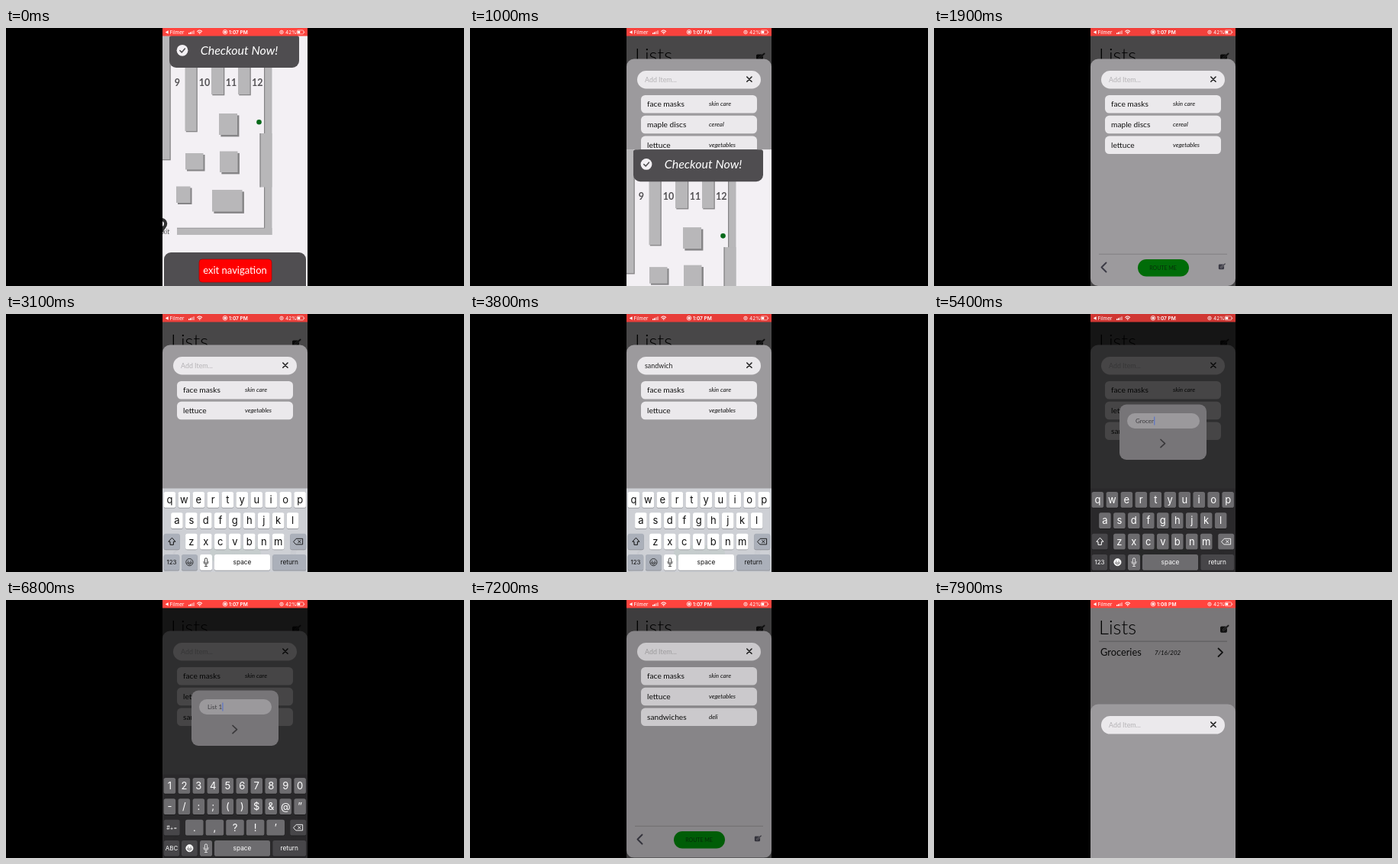
Write an HTML page that moves like this. It is 600 by 338 pixels and loops after 8000 ms.

```html
<!DOCTYPE html>
<html lang="en">
<head>
<meta charset="utf-8">
<title>Shopping list demo</title>
<style>
html, body { margin: 0; width: 100%; height: 100%; overflow: hidden; background: #000; }
svg { display: block; width: 600px; height: 338px; font-family: Lato, "Open Sans", sans-serif; }
text { white-space: pre; }
.ui { font-family: Inter, Roboto, sans-serif; }
.mid { text-anchor: middle; }
.it { font-style: italic; }
.line { fill: none; stroke-linecap: round; stroke-linejoin: round; }
</style>
</head>
<body>
<svg id="stage" viewBox="0 0 600 338"></svg>
<script>
const LOOP = 8000;
const rect = (x, y, w, h, fill, r = 0, extra = "") =>
  `<rect x="${x}" y="${y}" width="${w}" height="${h}" rx="${r}" fill="${fill}" ${extra}/>`;
const text = (x, y, size, fill, str, cls = "", extra = "") =>
  `<text x="${x}" y="${y}" font-size="${size}" fill="${fill}" class="${cls}" ${extra}>${str}</text>`;
const line = (d, color, width, extra = "") =>
  `<path class="line" d="${d}" stroke="${color}" stroke-width="${width}" ${extra}/>`;
const group = (id, body, extra = "") => `<g id="${id}" ${extra}>${body}</g>`;

const editIcon = (x, y, s, color) => `<g transform="translate(${x} ${y}) scale(${s})">` +
  rect(0, 1.5, 8.5, 8, color, 1.6) + line("M4 6.2L10 .8", "#89878a", 2.4) +
  line("M4 6.2L10 .8", color, 1.2) + "</g>";

function statusBar() {
  const bars = [0, 1, 2, 3].map(i =>
    rect(239 + i * 2.1, 6.2 - i, 1.5, 1.8 + i, "#fff", .3, i > 1 ? 'opacity=".55"' : "")).join("");
  return rect(205, 0, 190, 10.5, "#ff453f", 0, 'id="bar"') +
    '<path d="M212.6 3.2V7.8L208.8 5.5Z" fill="#fff"/>' +
    text(214.5, 7.7, 6.5, "#fff", "Filmer", "ui") + bars +
    line("M250.8 4.3Q253.7 1.8 256.6 4.3M252 5.9Q253.7 4.5 255.4 5.9", "#fff", 1.1) +
    '<circle cx="253.7" cy="7.3" r=".8" fill="#fff"/>' +
    '<circle cx="287" cy="5.3" r="2.8" fill="none" stroke="#fff" stroke-width=".8"/><circle cx="287" cy="5.3" r="1.5" fill="#fff"/>' +
    text(292, 7.7, 6.6, "#fff", "", "ui", 'id="clock" font-weight="600"') +
    '<circle cx="361" cy="5.4" r="2.2" fill="none" stroke="#fff" stroke-width=".8"/><circle cx="361" cy="5.4" r=".8" fill="#fff"/>' +
    text(366, 7.7, 6.5, "#fff", "42%", "ui") +
    rect(381, 2.9, 8.8, 5, "none", 1.3, 'stroke="#fff" stroke-width=".6"') +
    rect(381.8, 3.7, 3.4, 3.4, "#fff", .6) + rect(390.4, 4.5, .8, 1.8, "#fff", .4);
}

function mapView() {
  const block = (x, y, w, h, d = 2.4) => rect(x + d, y + d, w, h, "#858486") + rect(x, y, w, h, "#b8b7b9");
  const shelf = (x, y, w, h) => block(x, y, w, h, 1.3);
  return rect(205, 10, 190, 328, "#f3f0f4") +
    shelf(203, 10, 11.5, 162) + shelf(234.5, 20, 15, 115) + shelf(269, 20, 16, 67) + shelf(304, 20, 15.5, 67) +
    rect(338, 40, 10.5, 231, "#b8b7b9") + rect(338, 40, 1.2, 222, "#858486") +
    rect(332.5, 138, 16, 70.5, "#b8b7b9") + rect(332.5, 138, 1.2, 70.5, "#858486") +
    rect(224, 262, 124.5, 9, "#b8b7b9") + rect(224, 261.7, 115, 1, "#98979a") +
    block(279, 112, 24, 28) + block(235, 164, 23.5, 21.5, 2) + block(280, 161.5, 23.5, 27.5) +
    block(223, 207.5, 18.5, 21.5, 2) + block(270, 212, 39.5, 28.5) +
    [[9, 224.3], [10, 260], [11, 295], [12, 329.3]].map(([n, x]) =>
      text(x, 76.3, 12.5, "#555356", n, "mid", 'font-weight="700"')).join("") +
    '<circle cx="331.5" cy="123.2" r="3.3" fill="#08691a"/>' +
    '<circle cx="203.5" cy="256.5" r="5.6" fill="none" stroke="#333" stroke-width="4.2"/>' +
    '<path d="M210.6 259L204 270V264Z" fill="#333"/>' +
    text(214.5, 269.5, 9, "#555", "exit", "it", 'text-anchor="end"') +
    rect(214, 10, 170, 42, "#4f4d50", 9) + rect(214, 10, 170, 12, "#4f4d50", 3) +
    '<circle cx="231" cy="29.3" r="7.4" fill="#f3f0f4"/>' + line("M227.8 29.5L230.2 31.9L234.4 27", "#4f4d50", 1.5) +
    text(305.5, 35, 16, "#fff", "Checkout Now!", "it mid") +
    rect(207, 294, 186, 60, "#504e51", 9) +
    rect(253, 303, 95, 30, "#fe0000", 4, 'stroke="#a00" stroke-width=".7"') +
    text(300, 322, 13, "#fff", "exit navigation", "mid");
}

function listsPage() {
  return rect(205, 10, 190, 328, "#f3f0f4") +
    text(216, 45, 25.5, "#000", "Lists", "", 'font-weight="300"') + editIcon(375, 32.8, 1.05, "#222") +
    rect(216, 53.7, 168, .8, "#a5a3a6") + text(218, 73, 12.8, "#111", "Groceries") +
    text(289, 71.8, 8, "#111", "7/16/202", "it") + line("M372.5 63.5L378 68.7L372.5 74", "#222", 1.8);
}

function sheet() {
  const row = (id, name, kind) => group(id, rect(224, 88, 152, 23.5, "#ebe9ec", 5.5) +
    text(232, 103, 10.2, "#111", name) + text(313, 102, 8, "#111", kind, "it"));
  return rect(205, 40.5, 190, 297.5, "#9c9a9d", 10) +
    rect(219, 56, 162, 23.5, "#ebe9ec", 11.7) + text(229, 71, 8.9, "#b5b3b6", "", "", 'id="entry"') +
    line("M362.8 64L369 70.2M369 64L362.8 70.2", "#222", 1.6) +
    row("masks", "face masks", "skin care") + row("cereal", "maple discs", "cereal") +
    row("lettuce", "lettuce", "vegetables") + row("deli", "sandwiches", "deli") +
    rect(216, 295.8, 168, .8, "#7a787b") + line("M225.5 307.5L219.5 313.5L225.5 319.5", "#3c3b46", 1.9) +
    rect(267, 303, 67, 22.5, "#006c08", 11.2) + text(300, 316.7, 7, "#06300a", "ROUTE ME", "mid") +
    editIcon(372.8, 308.3, .85, "#3c3b46");
}

function popup() {
  return rect(243, 118.5, 114, 72.5, "#777578", 9) + rect(253, 130, 95, 20, "#9b999c", 10) +
    text(264, 142.8, 8, "#3d3c40", "", "", 'id="title"') +
    rect(264, 134.5, .9, 11, "#4668d8", 0, 'id="caret"') + line("M297 164.5L302.5 169.6L297 174.7", "#3a393b", 1.7);
}

const themes = {
  light: { bg: "#d1d3d9", key: "#fff", alt: "#abb0ba", ink: "#111", edge: "#898b90" },
  dark: { bg: "#2b2a2c", key: "#6d6c6f", alt: "#474649", ink: "#fff", edge: "#19191a" }
};

function keyboard(name, numeric) {
  const c = themes[name];
  const cap = (x, y, w, fill, label, size, extra = "") =>
    rect(x, y + .7, w, 20.8, c.edge, 2.6) + rect(x, y, w, 20.8, fill, 2.6, extra) +
    text(x + w / 2, y + 10.4 + size * .35, size, c.ink, label, "ui mid");
  const row = (keys, x, y, pitch = 18.97, w = 15.6) => [...keys].map((k, i) =>
    cap(x + i * pitch - w / 2, y, w, c.key, k.replace("&", "&amp;"), 13)).join("");
  const keys = numeric
    ? row("1234567890", 214.4, 233) + row("-/:;()$&@”", 214.4, 260.3) + row(".,?!’", 246.8, 287.7, 26.6, 23.6)
    : row("qwertyuiop", 214.4, 233) + row("asdfghjkl", 223.9, 260.3) + row("zxcvbnm", 242.9, 287.7);
  const shift = numeric ? "" : line("M217.2 293.5L212.8 298.2H215V302.3H219.4V298.2H221.6Z", c.ink, 1);
  const face = name === "dark" ? [c.ink, c.alt] : ["none", c.ink];
  return rect(205, 228.5, 190, 110, c.bg, 0, 'opacity=".95"') + keys +
    cap(206.7, 287.7, 21, c.alt, numeric ? "#+=" : "", 7) + shift +
    cap(372.2, 287.7, 21, c.alt, "", 7, 'class="erase"') +
    line("M376.8 298.1L380.2 294.3H388.6V301.9H380.2ZM382.7 296.5L386 299.8M386 296.5L382.7 299.8", c.ink, .9) +
    cap(206.7, 315, 20.5, c.alt, numeric ? "ABC" : "123", 8) + cap(230, 315, 20.8, c.alt, "", 8) +
    `<circle cx="240.4" cy="325.2" r="4.6" fill="${face[0]}" stroke="${c.ink}" stroke-width=".8"/>` +
    line("M238.7 323.8V324M242.1 323.8V324", face[1], 1.2) + line("M237.6 326.2Q240.4 330 243.2 326.2Z", face[1], .8) +
    cap(254, 315, 16, name === "light" ? c.key : c.key, "", 8) +
    rect(260.4, 319.8, 3.2, 6.5, "none", 1.6, `stroke="${c.ink}" stroke-width=".8"`) +
    line("M258.8 324.5Q259 328 262 328T265.2 324.5M262 328V330.5M260.3 330.5H263.7", c.ink, .7) +
    cap(273, 315, 73, c.key, "space", 8.3) + cap(349.3, 315, 43.8, c.alt, "return", 8.3);
}

const shade = id => rect(205, 10, 190, 328, "#000", 0, `id="${id}"`);
document.getElementById("stage").innerHTML =
  '<clipPath id="screen"><rect x="205" width="190" height="338"/></clipPath>' +
  rect(0, 0, 600, 338, "#000") +
  '<g clip-path="url(#screen)">' + listsPage() + shade("shadeA") + group("sheet", sheet()) +
  group("lightKeys", keyboard("light", false)) + shade("shadeB") + group("popup", popup()) +
  group("darkKeys", group("letters", keyboard("dark", false)) + group("digits", keyboard("dark", true))) +
  group("map", mapView()) + statusBar() + "</g>";

const el = {};
document.querySelectorAll("[id]").forEach(node => el[node.id] = node);
const eraseKeys = el.darkKeys.querySelectorAll(".erase");

const clamp = x => Math.max(0, Math.min(1, x));
const ramp = (t, start, span) => 1 - (1 - clamp((t - start) / span)) ** 2;
const shift = (node, x, y) => node.setAttribute("transform", `translate(${x} ${y})`);
const show = (node, on) => node.setAttribute("display", on ? "inline" : "none");
const typed = (str, t, start, step) => str.slice(0, Math.max(0, Math.floor((t - start) / step) + 1));

// Recording indicator glow: [time, red channel]
const glow = [[0, 255], [1900, 242], [3100, 236], [4500, 228], [5400, 208], [6800, 255], [8000, 255]];
function barRed(t) {
  const i = Math.max(1, glow.findIndex(g => g[0] > t));
  const [[t0, a], [t1, b]] = [glow[i - 1], glow[i]];
  return a + (b - a) * (t - t0) / (t1 - t0);
}

function titleAt(t) {
  if (t < 5250) return typed("Groceri", t, 4750, 70);
  if (t < 6000) return "Groceri".slice(0, Math.max(0, 6 - Math.floor((t - 5350) / 90)));
  return typed("List 1", t, 6050, 120);
}

function draw(t) {
  const red = barRed(t);
  el.bar.setAttribute("fill", `rgb(${red},${red * .265},${red * .245})`);
  el.clock.textContent = t < 7400 ? "1:07 PM" : "1:08 PM";

  const leave = ramp(t, 900, 400);
  shift(el.map, 0, 338 * leave);
  show(el.map, leave < 1);

  const sheetOpen = 1 - ramp(t, 7824, 500);
  shift(el.sheet, 0, 338 * (1 - sheetOpen));
  el.shadeA.setAttribute("opacity", .7 * sheetOpen);

  const cleared = t >= 7600;
  const removed = ramp(t, 2150, 300);
  shift(el.cereal, -190 * removed, 26.8);
  shift(el.lettuce, 0, 53.6 - 26.8 * ramp(t, 2400, 200));
  shift(el.deli, 0, 53.6);
  show(el.masks, !cleared);
  show(el.cereal, removed < 1);
  show(el.lettuce, !cleared);
  show(el.deli, t >= 4050 && !cleared);

  const entry = t < 4050 ? typed("sandwiches", t, 3180, 80) : "";
  el.entry.textContent = entry || "Add Item...";
  el.entry.setAttribute("fill", entry ? "#222" : "#b5b3b6");
  const light = ramp(t, 2700, 300) - ramp(t, 4050, 300);
  shift(el.lightKeys, 0, 112 * (1 - light));
  show(el.lightKeys, light > 0);

  const open = ramp(t, 4400, 500) - ramp(t, 6950, 450);
  shift(el.popup, 0, 338 * (1 - open));
  el.shadeB.setAttribute("opacity", .7 * open);
  show(el.popup, open > 0);
  const dark = ramp(t, 4530, 300) - ramp(t, 6950, 300);
  shift(el.darkKeys, 0, 112 * (1 - dark));
  show(el.darkKeys, dark > 0);
  const digits = t >= 6560;
  show(el.letters, !digits);
  show(el.digits, digits);
  const erasing = t >= 5300 && t < 5950;
  eraseKeys.forEach(k => k.setAttribute("fill", erasing ? themes.dark.key : themes.dark.alt));

  el.title.textContent = titleAt(t);
  const width = el.title.textContent && open > 0 ? el.title.getComputedTextLength() : 0;
  el.caret.setAttribute("x", 264.4 + width);
}

const begin = performance.now();
function tick() {
  draw((performance.now() - begin) % LOOP);
  requestAnimationFrame(tick);
}
tick();
</script>
</body>
</html>
```
